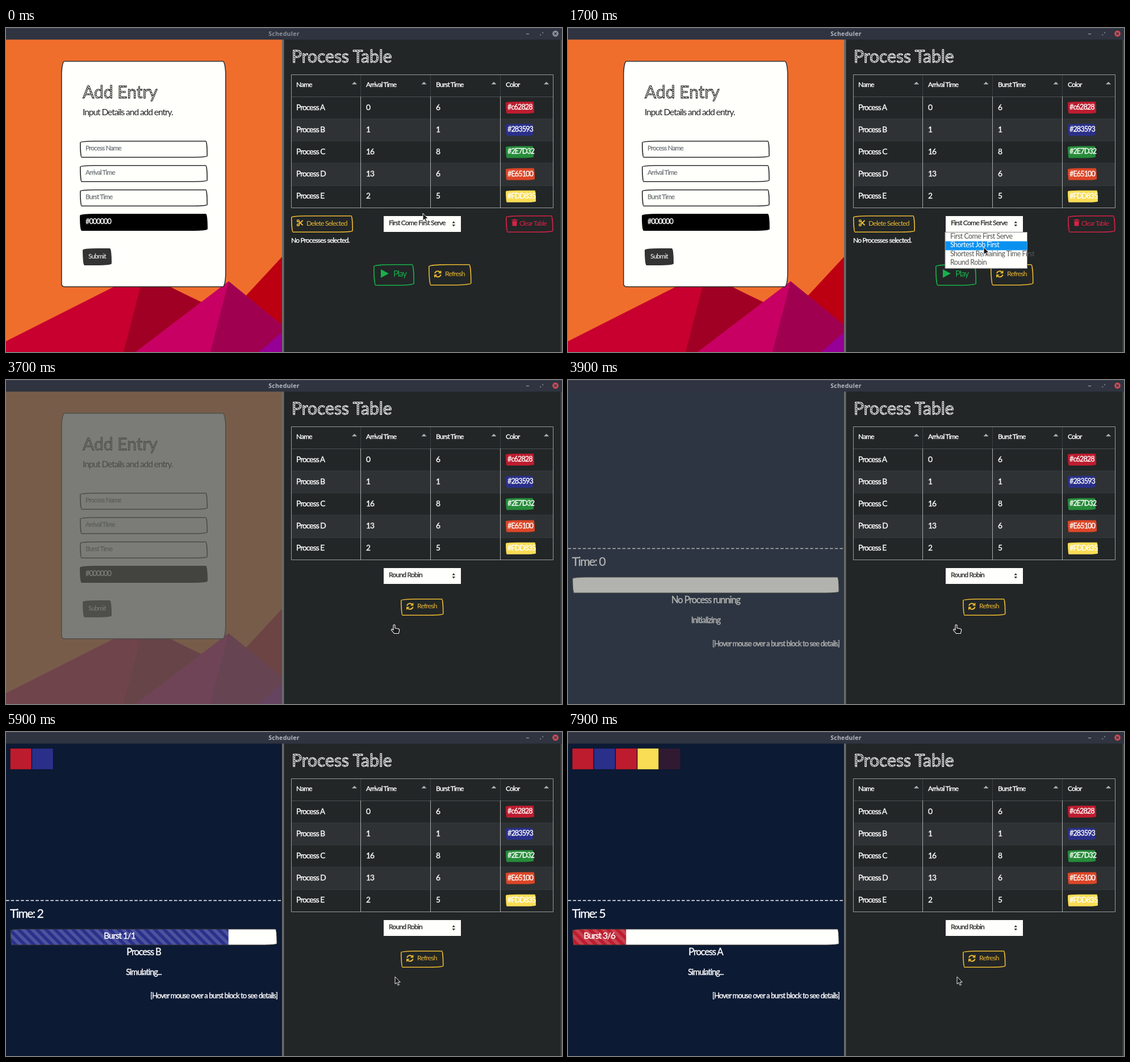
Recreate the animation shown at these times as an HTML page. Size 979x572 px, loop 8000 ms.

```html
<!DOCTYPE html>
<html lang="en">
<head>
<meta charset="utf-8">
<title>Scheduler</title>
<style>
html, body { margin: 0; width: 100%; height: 100%; overflow: hidden; background: #222627; }
svg { display: block; width: 979px; height: 572px; }
text { font-family: Lato, "Open Sans", sans-serif; letter-spacing: -.07em; white-space: pre; }
.bold { stroke-width: .35px; stroke: currentColor; }
.sketch { letter-spacing: 0; stroke-width: .9px; font-weight: 400; }
.bar { font: 700 10.5px "Noto Sans", sans-serif; letter-spacing: .3px; }
</style>
</head>
<body>
<svg id="stage" viewBox="0 0 979 572"></svg>
<script>
const LOOP = 8000, STEP = 100;
const RED = '#bd1c2e', BLUE = '#2a308a', GREEN = '#268c3a', ORANGE = '#dc4626', YELLOW = '#f9dd54';
const GOLD = '#ebb932', PLAY = '#19af4b', CRIMSON = '#d72346';
const PAPER = '#fffffb', NAVY = '#0c1a34';

const rect = (x, y, w, h, fill, more = '') =>
  `<rect x="${x}" y="${y}" width="${w}" height="${h}" fill="${fill}" ${more}/>`;
const path = (d, fill, more = '') => `<path d="${d}" fill="${fill}" ${more}/>`;
const line = (d, stroke, w = 1, more = '') => path(d, 'none', `stroke="${stroke}" stroke-width="${w}" ${more}`);
const text = (x, y, size, fill, str, more = '') =>
  `<text x="${x}" y="${y}" font-size="${size}" fill="${fill}" ${more}>${str}</text>`;
const strong = (x, y, size, fill, str, more = '') =>
  text(x, y, size, fill, str, `class="bold" color="${fill}" ${more}`);
const group = (id, body, more = '') => `<g id="${id}" ${more}>${body}</g>`;
const MID = 'text-anchor="middle"';

// Rounded outline with elliptical corners, scaled down like CSS border-radius.
function outline(x, y, w, h, rx = [255, 25, 225, 25], ry = [25, 225, 25, 255]) {
  const f = Math.min(1, w / (rx[0] + rx[1]), w / (rx[2] + rx[3]), h / (ry[0] + ry[3]), h / (ry[1] + ry[2]));
  const [a, b, c, d] = rx.map(r => r * f), [e, g, i, j] = ry.map(r => r * f);
  return `M${x + a} ${y}H${x + w - b}a${b} ${g} 0 0 1 ${b} ${g}V${y + h - i}a${c} ${i} 0 0 1 ${-c} ${i}` +
    `H${x + d}a${d} ${j} 0 0 1 ${-d} ${-j}V${y + e}a${a} ${e} 0 0 1 ${a} ${-e}z`;
}
const box = (x, y, w, h, fill, stroke, more = '') =>
  path(outline(x + .8, y + .8, w - 1.6, h - 1.6), fill, `stroke="${stroke}" stroke-width="1.6" ${more}`);

const hatch = (id, color) => `<pattern id="${id}" width="3" height="3" patternUnits="userSpaceOnUse"
  patternTransform="rotate(35)">${rect(0, 0, 3, 1.1, color)}</pattern>`;
const defs = `<defs>${hatch('light', '#fff')}${hatch('dark', '#222')}
  <pattern id="stripes" width="16" height="16" patternUnits="userSpaceOnUse">
  ${path('M0 8L8 16H0zM0 0H8L16 8V16z', '#fff', 'fill-opacity=".17"')}</pattern>
  <clipPath id="track">${path(outline(8, 348, 469, 28), '#000')}</clipPath>
  <clipPath id="filled">${rect(8, 348, 0, 28, '#000', 'id="fillClip"')}</clipPath></defs>`;

function form() {
  const hills = [
    ['M0 553L237 433L345 484L345 572H0z', '#c80030'],
    ['M243 433L207 572H400V514z', '#a00024'],
    ['M486 404L423 472L400 500V572H486z', '#bc0012'],
    ['M392 447L228 572H400z', '#c80064'],
    ['M392 447L360 572H486V524z', '#a00050'],
    ['M486 537L446 572H486z', '#960096']
  ].map(([d, c]) => path(d, c)).join('');
  const card = path(outline(97.8, 58.8, 289, 398, [5, 5, 5, 5], [25, 25, 25, 5]), PAPER, 'stroke="#333" stroke-width="1.6"');
  const fields = ['Process Name', 'Arrival Time', 'Burst Time'].map((s, i) =>
    box(130, 199 + 43 * i, 225, 30, PAPER, '#2b2b2b') + strong(140, 216 + 43 * i, 11.7, '#777c80', s)).join('');
  return rect(0, 20, 486, 552, '#f06e2c') + hills + card +
    text(135, 124, 30, 'url(#dark)', 'Add Entry', 'class="sketch" stroke="#222"') +
    text(135, 154, 15.6, '#222', 'Input Details and add entry.') + fields +
    box(130, 328, 225, 30, '#000', '#000') + strong(140, 346, 12.6, '#fff', '#000000') +
    box(135, 389, 51, 30, '#333', '#333') + text(145, 407, 11.7, '#fff', 'Submit');
}

function sim() {
  const blocks = RUNS.map((r, i) =>
    rect(7.5 + 38.25 * i, 29, 37.3, 37, r.color, 'class="block" stroke="#000" stroke-opacity=".3"')).join('');
  return rect(0, 20, 486, 552, NAVY) + blocks +
    line('M0 297.5H486', '#fff', 1.6, 'stroke-dasharray="5.5 3.2"') +
    strong(7, 328, 21, '#fff', '', 'id="clock"') +
    group('', rect(8, 348, 469, 28, PAPER) + rect(8, 348, 0, 28, RED, 'id="fill"') +
      rect(8, 348, 0, 28, 'url(#stripes)', 'id="fillStripes"') +
      group('', strong(0, 365, 15.5, '#fff', '', `id="burst" ${MID}`), 'clip-path="url(#filled)"'), 'clip-path="url(#track)"') +
    line(outline(8, 348, 469, 28), '#333', 1) +
    strong(242.5, 394, 16.6, '#fff', '', `id="job" ${MID}`) +
    strong(242.5, 429, 14.4, '#fff', '', `id="status" ${MID}`) +
    strong(478, 470, 13, '#fff', '[Hover mouse over a burst block to see details]', 'text-anchor="end"');
}

function table() {
  const cols = [511, 634, 757, 880], seps = [624.5, 747.5, 870.5];
  const rows = [
    ['Process A', 0, 6, '#c62828', RED, 50], ['Process B', 1, 1, '#283593', BLUE, 48],
    ['Process C', 16, 8, '#2E7D32', GREEN, 49], ['Process D', 13, 6, '#E65100', ORANGE, 51],
    ['Process E', 2, 5, '#FDD835', YELLOW, 53]
  ];
  let out = text(503, 61, 30, 'url(#light)', 'Process Table', 'class="sketch" stroke="#fff"');
  out += rect(503, 160, 460, 39, '#2f3234') + rect(503, 238, 460, 40, '#2f3234');
  out += rect(503, 278, 460, 40, '#3a3d3f', 'id="rowHover"');
  out += line('M503 121.5H963', '#4c5154') + line('M503 160.5H963M503 199.5H963M503 238.5H963M503 278.5H963', '#34393c');
  out += seps.map(x => line(`M${x} 83V121`, '#3c4144') + line(`M${x} 121V318`, '#a9abac')).join('');
  out += line('M502.5 82.5H963.5V317.5H502.5z', '#9b9d9e');
  ['Name', 'Arrival Time', 'Burst Time', 'Color'].forEach((s, i) => {
    const x = [613.5, 736, 859, 951.5][i];
    out += strong(cols[i], 104, 12, '#fff', s) + path(`M${x - 4.5} 99.5L${x} 95L${x + 4.5} 99.5z`, '#b0b2b3');
  });
  rows.forEach(([name, at, burst, hex, color, w], i) => {
    const y = 144.5 + 39.2 * i;
    out += [name, at, burst].map((s, k) => strong(cols[k], y, 13.8, '#fff', s)).join('');
    out += path(outline(880, y - 14.5, w, 21), color) + strong(883, y - .5, 12.6, '#fff', hex);
  });
  return out;
}

const refresh = (x, y, h) => box(x, y, 75.5, h, 'none', GOLD) +
  line(`M${x + 11} ${y + h / 2 - 2.5}a5.4 5.4 0 0 1 9.4 -2M${x + 21.6} ${y + h / 2 - .5}a5.4 5.4 0 0 1 -9.6 2`, GOLD, 2) +
  path(`M${x + 22.4} ${y + h / 2 - 8}v5.6h-5.6zM${x + 10} ${y + h / 2 + 5.2}v-5.6h5.6z`, GOLD) +
  text(x + 29, y + h / 2 + 2.3, 12.2, GOLD, 'Refresh');

function controls() {
  const scissors = `<g transform="translate(512 338)">` +
    line('M3.6 3.6L10.6 10.2M3.6 8.4L10.6 1.8', GOLD, 2) +
    `<g fill="none" stroke="${GOLD}" stroke-width="1.6"><circle cx="2.4" cy="2.5" r="1.8"/><circle cx="2.4" cy="9.5" r="1.8"/></g></g>`;
  const trash = path('M890.5 338.5h3l.6-1h2.8l.6 1h3v1.6h-10zM891.2 341h8.6l-.6 8.5h-7.4z', CRIMSON);
  return box(502, 331, 109, 30, 'none', GOLD) + scissors + text(529, 348.5, 12.2, GOLD, 'Delete Selected') +
    box(880, 331, 83.5, 30, 'none', CRIMSON) + trash + text(904, 348.5, 11.9, CRIMSON, 'Clear Table') +
    strong(502, 379, 12.1, '#fff', 'No Processes selected.') +
    box(647, 417, 72, 38, 'none', PLAY, 'id="playBox"') +
    group('playInk', path('M660 426L674 433.5L660 441z') .replace('fill="undefined"', '') +
      '<text x="682" y="439" font-size="14.8">Play</text>') +
    refresh(744, 417, 37.5);
}

const OPTIONS = ['First Come First Serve', 'Shortest Job First', 'Shortest Remaining Time First', 'Round Robin'];
const menu = () => rect(664, 360.5, 144.5, 64, PAPER, 'stroke="#8c8c8c"') +
  rect(664.5, 361, 143.5, 15.8, '#0a91f0', 'id="pick"') +
  OPTIONS.map((s, i) => text(673, 371.5 + 15.5 * i, 12.4, '#555', s, 'class="option" style="letter-spacing:-.04em"')).join('');

const chrome = () => rect(0, 0, 979, 20.5, '#2f3440') + line('M0 .5H979', '#3a404d') +
  `<text id="caption" class="bar" x="489.5" y="13.5" ${MID}>Scheduler</text>` +
  line('M916 10.5H921', '#8f949e', 1.4) +
  path('M943.5 7.5h2.5v2.5zM940.5 10.5v2.5h2.5z', '#8f949e') +
  '<circle id="close" cx="967.5" cy="10" r="5.4"/>' + line('M965.5 8l4 4m0 -4l-4 4', '#2f3440', 1.3);

const pointer = () =>
  path('M0 0V13L3 10.3L5.1 15.2L7.3 14.2L5.2 9.5H9.2z', '#1a1a1a', 'id="arrow" stroke="#fff" stroke-width=".9" stroke-linejoin="round"') +
  path('M-3 1Q-1.5 -1 0 1V6L6 7.2Q8 7.8 7.6 10L6.4 15.5H-1.5L-6.5 9.5Q-6.6 7.4 -4.6 8L-3 9.4z', '#1a1a1a',
    'id="hand" stroke="#fff" stroke-width="1.1" stroke-linejoin="round"');

// One entry per clock tick: when it starts, who runs, and how full the bar becomes.
const run = (at, job, color, done, total) => ({ at, job, color, label: `Burst ${done}/${total}`, part: done / total });
const RUNS = [
  run(4960, 'Process A', RED, 1, 6), run(5612, 'Process B', BLUE, 1, 1), run(6373, 'Process A', RED, 2, 6),
  run(7134, 'Process E', YELLOW, 1, 5), run(7895, 'Process A', RED, 3, 6)
];
const CURSOR = [
  [0, 734, 327], [400, 734, 327], [500, 735, 312], [600, 735, 322], [700, 737, 340], [1000, 737, 340],
  [1200, 736, 356], [1400, 736, 360], [2000, 728, 414], [2700, 728, 414], [3200, 685, 432], [LOOP, 685, 432]
];
const VEIL = [[0, 0], [3500, 0], [3600, .35], [3700, .78], [3800, .9], [3900, .45], [4000, .04], [4200, 0], [LOOP, 0]];

document.getElementById('stage').innerHTML = defs + rect(0, 0, 979, 572, '#222627') +
  group('form', form()) + group('sim', sim()) + rect(0, 20, 486, 552, '#565853', 'id="veil"') +
  rect(486, 20, 3.5, 552, '#6a6b6b') + rect(976.5, 20, 2.5, 552, '#44484a') +
  table() + rect(665, 332, 136, 28, PAPER) + strong(674, 348, 12.2, '#333', '', 'id="choice"') +
  path('M785.5 344.5L788.3 341L791 344.5zM785.5 347L788.3 350.5L791 347z', '#333') +
  group('idle', controls()) + group('busy', refresh(695, 386, 30)) + group('menu', menu()) +
  chrome() + group('cursor', pointer());

const el = id => document.getElementById(id);
const show = (id, on) => el(id).setAttribute('display', on ? 'inline' : 'none');
const set = (id, name, v) => el(id).setAttribute(name, v);
const blocks = [...document.querySelectorAll('.block')], options = [...document.querySelectorAll('.option')];
const clamp = v => Math.max(0, Math.min(1, v));

function at(keys, t) {
  const i = Math.max(1, keys.findIndex(k => k[0] > t));
  const a = keys[i - 1], b = keys[i], u = clamp((t - a[0]) / (b[0] - a[0]));
  return a.slice(1).map((v, k) => v + (b[k + 1] - v) * u);
}
// CSS "ease": cubic-bezier(.25, .1, .25, 1)
function ease(x) {
  const bez = (p, q, s) => 3 * p * s * (1 - s) ** 2 + 3 * q * s * s * (1 - s) + s ** 3;
  let lo = 0, hi = 1;
  for (let i = 0; i < 20; i++) {
    const m = (lo + hi) / 2;
    if (bez(.25, .25, m) < x) lo = m; else hi = m;
  }
  return bez(.1, 1, lo);
}

function drawSim(t) {
  const n = RUNS.filter(r => r.at <= t).length, now = RUNS[Math.max(0, n - 1)];
  const from = n > 1 ? RUNS[n - 2].part : 0;
  const part = n ? from + (now.part - from) * ease(clamp((t - now.at) / 600)) : 0;
  const w = 469 * part, started = t >= 4200;
  blocks.forEach((b, i) => b.setAttribute('opacity', clamp((t - RUNS[i].at + 45) / 250)));
  ['fill', 'fillStripes', 'fillClip'].forEach(id => set(id, 'width', w));
  set('fill', 'fill', now.color);
  set('stripes', 'patternTransform', `translate(${8 - (t % 1000) * .016} 348)`);
  set('burst', 'x', 8 + w / 2);
  el('burst').textContent = n ? now.label : '';
  el('clock').textContent = 'Time: ' + n;
  el('job').textContent = started ? now.job : 'No Process running';
  el('status').textContent = started ? 'Simulating...' : 'Initializing';
}

function draw(t) {
  const [x, y] = at(CURSOR, t), focused = t >= 1000, playing = t >= 3600;
  const picked = Math.max(0, Math.min(3, Math.floor((y - 361) / 15.6)));
  const hover = t >= 2900 && t < 3600;
  set('cursor', 'transform', `translate(${x} ${y})`);
  show('hand', t >= 2900 && t < 4000);
  show('arrow', t < 2900 || t >= 4000);
  show('rowHover', y < 318);
  set('caption', 'fill', focused ? '#b3b7c0' : '#8b8f98');
  set('close', 'fill', focused ? '#cc4b55' : '#8b8f98');
  show('menu', t >= 1000 && t < 2700);
  set('pick', 'y', 361 + 15.5 * picked);
  options.forEach((o, i) => o.setAttribute('fill', i === picked ? '#fff' : '#555'));
  el('choice').textContent = OPTIONS[t < 2700 ? 0 : 3];
  set('playBox', 'fill', hover ? PLAY : 'none');
  set('playInk', 'fill', hover ? '#fff' : PLAY);
  show('idle', !playing);
  show('busy', playing);
  show('form', t < 3800);
  show('sim', t >= 3800);
  set('veil', 'opacity', at(VEIL, t)[0]);
  drawSim(t);
}

const start = performance.now();
function tick() {
  const t = Math.max(0, performance.now() - start) % LOOP;
  draw(Math.floor(t / STEP) * STEP);
  requestAnimationFrame(tick);
}
tick();
</script>
</body>
</html>
```
